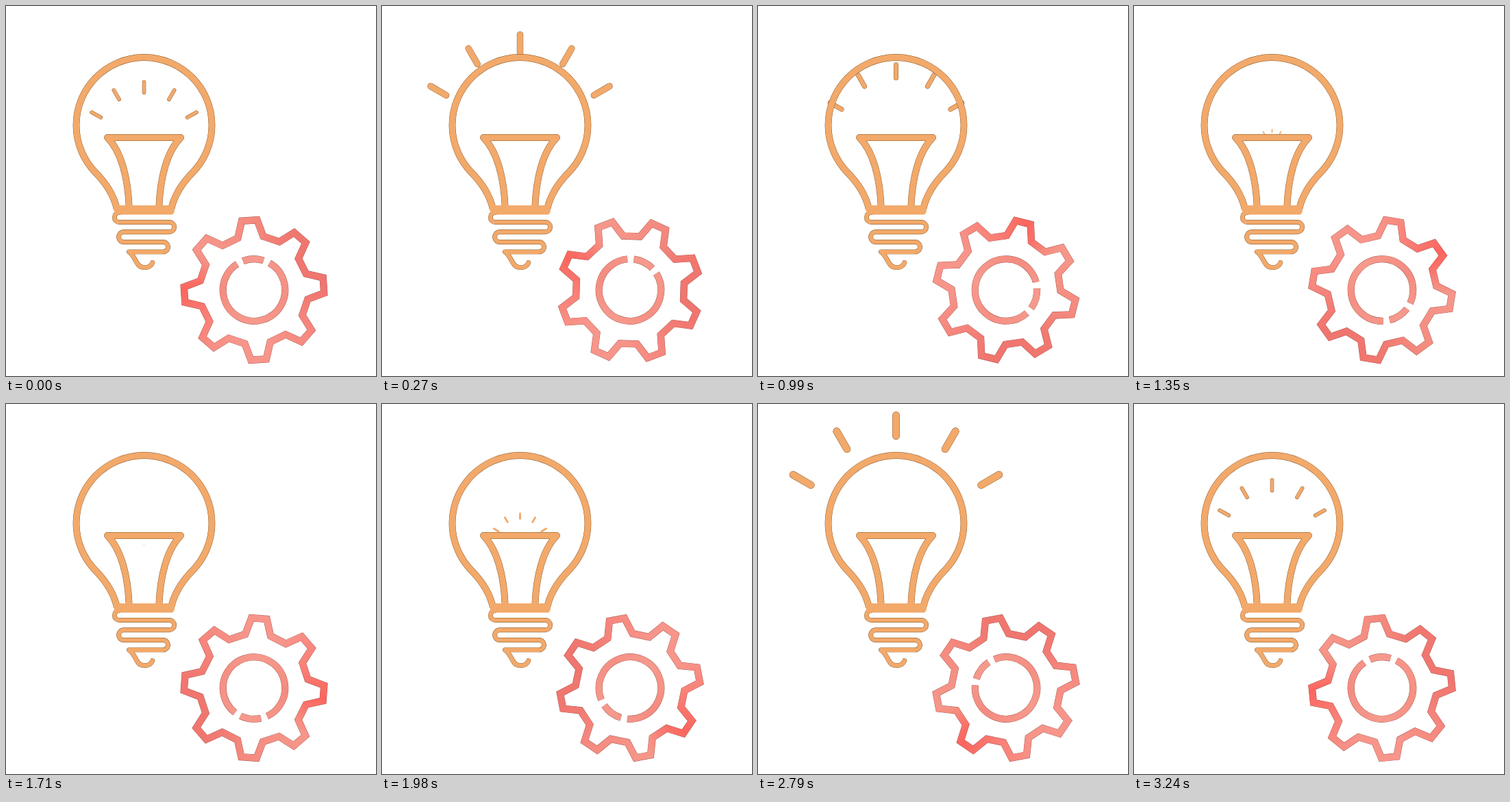
Animation, 540 px wide and 540 px high, one loop 3.33 s. Source, as an HTML page with a canvas:

```html
<!DOCTYPE html>
<html lang="en">
<head>
<meta charset="utf-8">
<title>Idea and gear</title>
<style>
  html, body { margin: 0; width: 100%; height: 100%; overflow: hidden; background: #fff; }
  canvas { display: block; width: 540px; height: 540px; }
</style>
</head>
<body>
<canvas id="stage" width="540" height="540"></canvas>
<script>
const ctx = document.getElementById('stage').getContext('2d');
const STEP = 90, STEPS = 37;
const ORANGE = '#f2a96a', ORANGE_RIM = '#80552a', RED_RIM = '#a0564e';
const RAD = Math.PI / 180;
const MID = 201.5;

// Bulb parts as centre lines
const glass = new Path2D('M162 297 C159 283 151 264 131.5 244 A99 99 0 1 1 271.5 244 C252 264 244 283 241 297');
const filament = new Path2D('M148 192 H255 C235 212 225 250 223.3 294 M148 192 C168 212 178 250 179.7 294');
const screw = new Path2D('M165.5 301.3 A7.1 7.1 0 0 0 165.5 315.5 H238.5 A7.1 7.1 0 0 1 238.5 329.7 ' +
  'H172 A7.4 7.4 0 0 0 172 344.5 H229.2 A7.2 7.2 0 0 1 229.2 358.9 H179.5 ' +
  'C186 363 188 371 192.5 377 C198 384 211 383 213.8 374.5');
const collar = new Path2D('M158 291 H245 L246 299 Q245 304.5 241 304.5 H160 Q156.5 298 158 291 Z');

// Eight-toothed wheel, first tooth pointing up
const wheel = new Path2D();
for (let i = 0; i < 8; i++) {
  for (const [r, a] of [[79.5, -13.5], [102.3, -6.3], [102.3, 6.3], [79.5, 13.5]]) {
    const angle = (i * 45 + a) * RAD;
    wheel.lineTo(r * Math.sin(angle), -r * Math.cos(angle));
  }
}
wheel.closePath();

const ring = new Path2D();
for (const [from, to] of [[-21, 18], [29.7, 327.2]]) {
  const start = (from - 90) * RAD;
  ring.moveTo(45.3 * Math.cos(start), 45.3 * Math.sin(start));
  ring.arc(0, 0, 45.3, start, (to - 90) * RAD);
}

function conic(stops) {
  const g = ctx.createConicGradient(-Math.PI / 2, 0, 0);
  stops.forEach(([at, color]) => g.addColorStop(at, color));
  return g;
}
const wheelPaint = conic([[0, '#f58b80'], [.11, '#f0776f'], [.25, '#f0756e'], [.36, '#f6877e'],
  [.47, '#f8958a'], [.58, '#f8958a'], [.7, '#f97a71'], [.76, '#fb655e'], [.86, '#f6978a'], [1, '#f58b80']]);
const ringPaint = conic([[0, '#f69a8d'], [.3, '#f58f83'], [.5, '#f79a8d'], [.75, '#f48c80'], [1, '#f69a8d']]);

// Line with a hairline darker rim
function line(path, width, paint, rim, cap = 'butt', join = 'round') {
  ctx.lineCap = cap;
  ctx.lineJoin = join;
  ctx.strokeStyle = rim;
  ctx.lineWidth = width;
  ctx.stroke(path);
  ctx.strokeStyle = paint;
  ctx.lineWidth = width - 0.8;
  ctx.stroke(path);
}

function drawRays(scale) {
  const width = 11 * scale;
  if (width < 0.01) return;
  for (let a = -60; a <= 60; a += 30) {
    const sin = Math.sin(a * RAD), cos = Math.cos(a * RAD);
    const at = r => [MID + scale * r * sin, 208.7 - scale * (19 + r * cos)];
    const ray = new Path2D();
    ray.moveTo(...at(145.9));
    ray.lineTo(...at(176.5));
    line(ray, width, ORANGE, width > 3 ? ORANGE_RIM : ORANGE, 'round');
  }
}

function drawBulb() {
  line(glass, 9.8, ORANGE, ORANGE_RIM);
  line(filament, 9.8, ORANGE, ORANGE_RIM, 'round');
  line(screw, 6.9, ORANGE, ORANGE_RIM, 'round');
  ctx.fillStyle = ORANGE;
  ctx.fill(collar);
}

function drawGear(turn) {
  ctx.save();
  ctx.translate(362, 414.5);
  ctx.rotate(turn * RAD);
  line(ring, 10, ringPaint, RED_RIM);
  ctx.rotate(-3.8 * RAD);
  line(wheel, 10.4, wheelPaint, RED_RIM, 'butt', 'miter');
  ctx.restore();
}

function draw(now) {
  const n = Math.floor(now / STEP) % STEPS;
  ctx.fillStyle = '#fff';
  ctx.fillRect(0, 0, 540, 540);
  drawRays(0.5 + 0.5 * Math.sin(n * Math.PI / 12));
  drawBulb();
  drawGear(n ? n * 10 - 2 : 0);
}

const begin = performance.now();
function tick() {
  draw(performance.now() - begin);
  requestAnimationFrame(tick);
}
tick();
</script>
</body>
</html>
```
